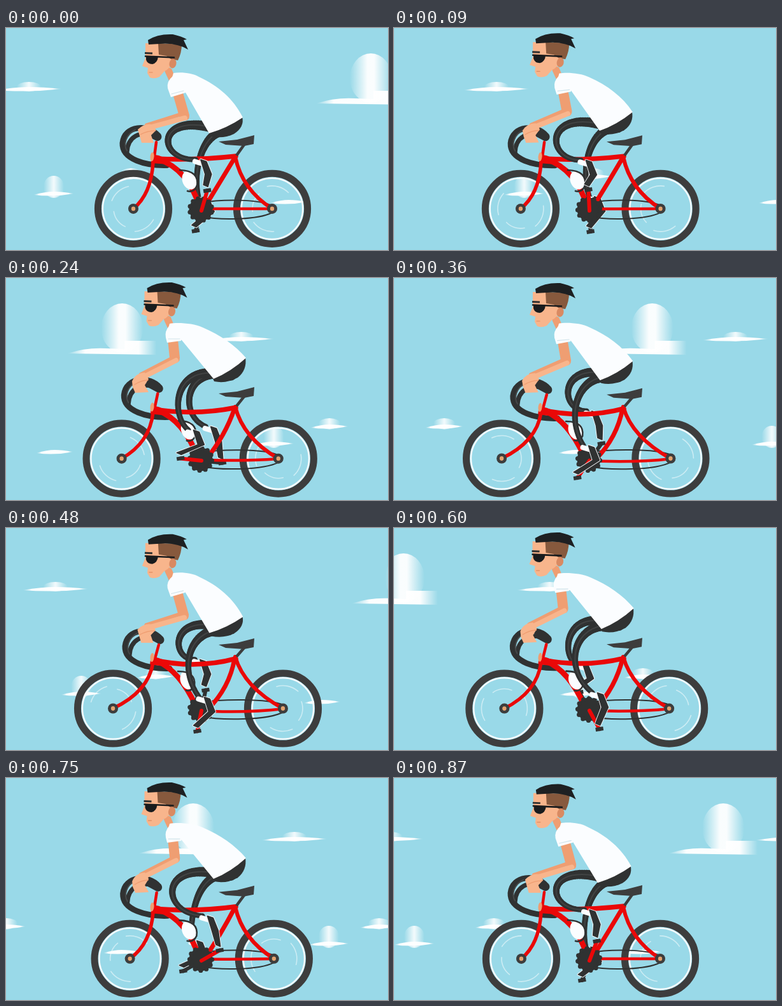
Animation, 600 px wide and 350 px high, one loop 900 ms. Source, as an HTML page with a canvas:

```html
<!DOCTYPE html>
<html lang="en">
<head>
<meta charset="utf-8">
<title>Cyclist</title>
<style>
html, body { margin: 0; width: 100%; height: 100%; overflow: hidden; background: #99d9e8; }
canvas { display: block; width: 600px; height: 350px; }
</style>
</head>
<body>
<canvas id="stage" width="600" height="350"></canvas>
<script>
const ctx = document.getElementById('stage').getContext('2d');
const LOOP = 900, STEP = 30, TAU = Math.PI * 2;
const SKY = '#99d9e8', DARK = '#3d3d3d', BLACK = '#303232', RED = '#ea0808';
const SKIN = '#f8b58c', SHADE = '#ef9e72', WHITE = '#fbfdff', TAN = '#e3a36f';

const { sin, cos, PI } = Math;
// Cosine with slightly flattened turning points.
const swing = a => 1.11 * cos(a) - 0.11 * cos(3 * a);
// Body bob: short stay at 1, long stay at -1.
const bob = a => {
  const c = cos(a - 0.07);
  return c + 0.6 * (c * c - 1);
};
const wrap = (v, n) => ((v % n) + n) % n;

// Blend two paths with the same commands: w = 0 gives a, w = 1 gives b.
function morph(a, b, w) {
  const to = b.match(/-?[\d.]+/g);
  let i = 0;
  return a.replace(/-?[\d.]+/g, n => (+n + (to[i++] - n) * w).toFixed(2));
}
function fill(d, color) {
  ctx.fillStyle = color;
  ctx.fill(new Path2D(d));
}
function line(d, color, width, cap = 'round') {
  ctx.strokeStyle = color;
  ctx.lineWidth = width;
  ctx.lineCap = cap;
  ctx.lineJoin = 'round';
  ctx.stroke(new Path2D(d));
}
function oval(x, y, rx, ry, color, tilt = 0) {
  ctx.fillStyle = color;
  ctx.beginPath();
  ctx.ellipse(x, y, rx, ry, tilt, 0, TAU);
  ctx.fill();
}
function ring(x, y, r, width, color, from = 0, to = TAU) {
  ctx.strokeStyle = color;
  ctx.lineWidth = width;
  ctx.beginPath();
  ctx.arc(x, y, r, from, to);
  ctx.stroke();
}
function fade(x0, x1, edge, alpha) {
  const g = ctx.createLinearGradient(x0, 0, x1, 0);
  const mid = `rgba(255,255,255,${alpha})`;
  g.addColorStop(0, 'rgba(255,255,255,0)');
  g.addColorStop(edge, mid);
  g.addColorStop(1 - edge, mid);
  g.addColorStop(1, 'rgba(255,255,255,0)');
  return g;
}

function bigCloud(x) {
  oval(x, 79, 33, 39, fade(x - 33, x + 33, 0.42, 0.95));
  fill(`M${x - 86} 119Q${x - 56} 109 ${x - 24} 111L${x + 4} 112V99H${x + 54}V121Z`,
    fade(x - 86, x + 54, 0.2, 0.97));
}
function smallCloud(x, y, half, bump, high) {
  oval(x, y - high * 0.42, bump, high * 0.58, fade(x - bump, x + bump, 0.48, 0.85));
  fill(`M${x - half} ${y}Q${x - half * 0.4} ${y - 5} ${x} ${y - 5}T${x + half} ${y - 2}Q${x} ${y + 4} ${x - half} ${y}Z`,
    fade(x - half, x + half, 0.14, 0.97));
}
function sky(t) {
  const p = t % 450;
  ctx.fillStyle = SKY;
  ctx.fillRect(0, 0, 600, 350);
  bigCloud(wrap(294 + 1.86 * (p - 300) + 110, 837) - 110);
  const rows = [[36, 1.39, 98, 52, 19, 13], [75, 1.44, 263, 32, 16, 30], [196, 1.3, 236, 30, 17, 15], [444, 1.75, 276, 29, 6, 2]];
  for (const [x0, v, y, half, bump, high] of rows) {
    const span = v * 450, x = wrap(x0 + v * p + 60, span) - 60;
    smallCloud(x, y, half, bump, high);
    smallCloud(x + span, y, half, bump, high);
  }
}

function wheel(x, y, turn) {
  ring(x, y, 55.6, 11, DARK);
  ring(x, y, 48.2, 2.5, '#f4fbfd');
  ctx.lineCap = 'round';
  for (const [r, a] of [[36, 0.5], [36, 3.5], [31, 2]])
    ring(x, y, r, 1.6, 'rgba(255,255,255,.5)', a + turn, a + turn + 1);
}
function hub(x, y) {
  oval(x, y, 8, 8, DARK);
  oval(x, y, 3.2, 3.4, TAN);
}

// Tapered leg along a cubic from hip to ankle.
function leg(h, p, q, a) {
  for (let i = 0; i <= 60; i++) {
    const s = i / 60, r = 1 - s;
    const at = n => r * r * r * h[n] + 3 * r * r * s * p[n] + 3 * r * s * s * q[n] + s * s * s * a[n];
    const w = 4.2 + 4.6 * r * r;
    oval(at(0), at(1), w, w, BLACK);
  }
  line(`M${h}C${p} ${q} ${a}`, '#414343', 2);
}

function limb(angle, b, near) {
  const c = cos(angle), s = sin(angle), u = (1 + s) / 2, off = near ? 0 : 22;
  const px = 307 + 33 * c, py = 288 + 33 * s;
  const ax = px - 6 - 20 * c + 6 * s, ay = py - 48 - 6 * c - 4 * s;
  line(`M307 288L${px} ${py}`, near ? RED : BLACK, 6);
  line(`M${px - 6} ${py + 1}l12 -2`, BLACK, 6, 'butt');
  leg([340 - 2 * b + off / 2, 157 + 4 * b],
    [236 + 50 * u - 6 * c + off, 122 + 35 * u + 5 * b],
    [235 + 35 * u - 6 * c + off, 208 + 15 * u], [ax - 1, ay - 3]);
  line(`M${ax - 2} ${ay}L${ax + 8} ${ay + 3}`, WHITE, 8);
  const shoe = `M${ax + 7} ${ay - 3}L${ax + 16} ${ay}L${ax + 24} ${ay + 20}L${px + 1} ${py - 6}L${px - 6} ${py - 9}L${ax + 14} ${ay + 20}Z`;
  line(shoe, WHITE, 3.4);
  fill(shoe, BLACK);
  line(shoe, BLACK, 1.6);
}

function frame(k, lx, rx, y) {
  const w = (1 - k) / 2, mix = (a, b) => morph(a, b, w);
  // chain and stays
  line(mix('M306 276C335 270 395 269 418 280M306 297C335 303 395 303 418 291',
    'M306 275C335 270 410 268 436 279M306 297C335 303 410 304 436 290'), BLACK, 2);
  line(mix('M322 285Q370 285 418 285', 'M325 289Q385 291 436 285'), RED, 4.5);
  line(`M360 203Q${371 + 3 * w} ${255 - 4 * w} ${rx} ${y}`, RED, 6);
  // fork and stem
  line(`M231 212Q${228 - 4 * w} ${262 - 4 * w} ${lx} ${y}`, RED, 5.5);
  line(mix('M236 180L232 210', 'M240 184L232 213'), RED, 4.5);
  // main tubes
  line(mix('M359 205Q335 245 310 286', 'M359 206Q351 252 317 286'), RED, 7);
  line(mix('M234 206Q298 209 361 202', 'M232 208Q298 223 361 206'), RED, 7.5);
  line(mix('M240 207Q286 223 304 282', 'M238 210Q273 226 298 280'), RED, 8.5);
  fill(mix('M229 199L240 201L257 208L256 215L228 213Z', 'M228 202L240 205L257 212L255 219L226 215Z'), RED);
  oval(229.5, 203 + w, 3, 7, SHADE, 0.1);
  // bottle
  oval(288 - 3 * w, 240, 11, 15, WHITE, -0.35);
  line(mix('M273 224Q304 225 300 249Q295 260 285 257', 'M270 226Q299 226 296 249Q291 258 283 256'), BLACK, 2.6);
  // saddle
  const d = 5 * w;
  line(`M374 ${184 + d}L362 ${201 + d / 3}`, DARK, 4.5, 'butt');
  fill(`M334 ${179 + d}L363 ${176 + d}L390 ${169 + d}L389 ${183 + d}L374 ${186 + d}L345 ${184 + d}Z`, DARK);
}

function gear(turn) {
  oval(306, 286, 18.5, 18.5, BLACK);
  for (let i = 0; i < 12; i++) {
    const a = turn + i * TAU / 12;
    oval(306 + 17.5 * cos(a), 286 + 17.5 * sin(a), 3.6, 3.6, BLACK);
  }
}

function bars(k) {
  ctx.save();
  ctx.translate(-2 * k, -2.5 * k);
  line('M238 172C211 163 193 175 192 198', BLACK, 7);
  line('M241 172C226 154 188 155 185 184C184 210 222 220 255 219', BLACK, 9);
  line('M205 163C190 171 186 186 192 196', '#464848', 2);
  line('M227 167L240 174', BLACK, 13);
  ctx.restore();
}

function head(b) {
  const w = (1 - b) / 2;
  ctx.save();
  ctx.translate(-1.5 * w, -3 * w);
  fill('M247 58L260 64L264 74L256 83L250 70Z', SHADE);
  fill('M219 24L262 25L263 52Q258 64 249 68L241 77Q233 81 226 78L222 71L223 63L214 60L219 47Z', SKIN);
  fill('M239 24L276 26Q276 39 270 51L259 49L252 44L240 42Z', '#87593d');
  oval(262, 56, 5.5, 7.5, '#d98a62', 0.2);
  fill('M224 26L223 19Q238 9 262 10Q276 13 284 18L279 19L286 34Q272 25 250 24.5Z', '#1e2022');
  line('M218 39.5L230 40', BLACK, 3, 'butt');
  line('M219 44.5L264 46.5', '#191b1d', 2.6);
  fill('M220 44L239 45Q238 55 230 57Q222 57 220 50Z', '#191b1d');
  line('M225 70L230 70', '#df8b60', 1.2);
  ctx.restore();
}

function torso(b) {
  const w = (1 - b) / 2, mix = (c, d) => morph(c, d, w);
  fill(mix('M318 163L371 140Q375 156 358 167Q342 175 322 171Z', 'M324 157L376 125Q379 145 364 157Q346 167 327 163Z'), BLACK);
  fill(mix('M263 71C275 69 294 71 303 77C333 91 357 111 372 141Q347 158 319 166L281 100L258 88Z',
    'M257 72C269 70 294 71 309 78C337 90 360 106 377 126Q353 148 326 159L276 98L253 86Z'), WHITE);
}

function arms(b) {
  const w = (1 - b) / 2, mix = (c, d) => morph(c, d, w);
  line(mix('M272 137L221 153', 'M262 126L212 152'), SHADE, 6);
  fill(mix('M262 104L278 102L288 137Q289 146 280 146L272 139Z', 'M254 96L270 97L273 126Q273 134 265 134L257 126Z'), SHADE);
  line(mix('M281 142L225 157', 'M267 130L216 156'), SKIN, 8);
  fill(mix('M207 160Q217 150 229 152L236 161L228 169L232 181L213 181L210 170Z',
    'M198 163Q203 150 218 149L224 159L218 169L224 180L203 181L199 172Z'), SKIN);
  line(mix('M211 168Q222 162 234 162', 'M202 168Q213 161 223 161'), SHADE, 1.4);
  // sleeve
  fill(mix('M262 76Q252 84 254 95L259 109L282 102L280 88Z', 'M256 76Q249 84 251 94L253 102L275 99L275 86Z'), WHITE);
  line(mix('M260 104L279 99', 'M255 96L273 96'), '#cfe3ea', 1.2);
}

function draw(t) {
  const a = t / LOOP * TAU;
  const k = swing(a), b = bob(2 * a);
  const lx = 184 + 16 * k, rx = 426.5 - 8.5 * k, y = 284.7 + 0.2 * k;
  const crank = (-74 + 18 * sin(2 * a)) * PI / 180 - a;
  sky(t);
  wheel(lx, y, -a);
  wheel(rx, y, 1 - a);
  limb(crank + PI, b, false);
  bars(k);
  frame(k, lx, rx, y);
  hub(lx, y);
  hub(rx, y);
  gear(crank);
  head(b);
  limb(crank, b, true);
  torso(b);
  arms(b);
}

function tick() {
  draw(Math.floor(performance.now() % LOOP / STEP) * STEP);
  requestAnimationFrame(tick);
}
tick();
</script>
</body>
</html>
```
